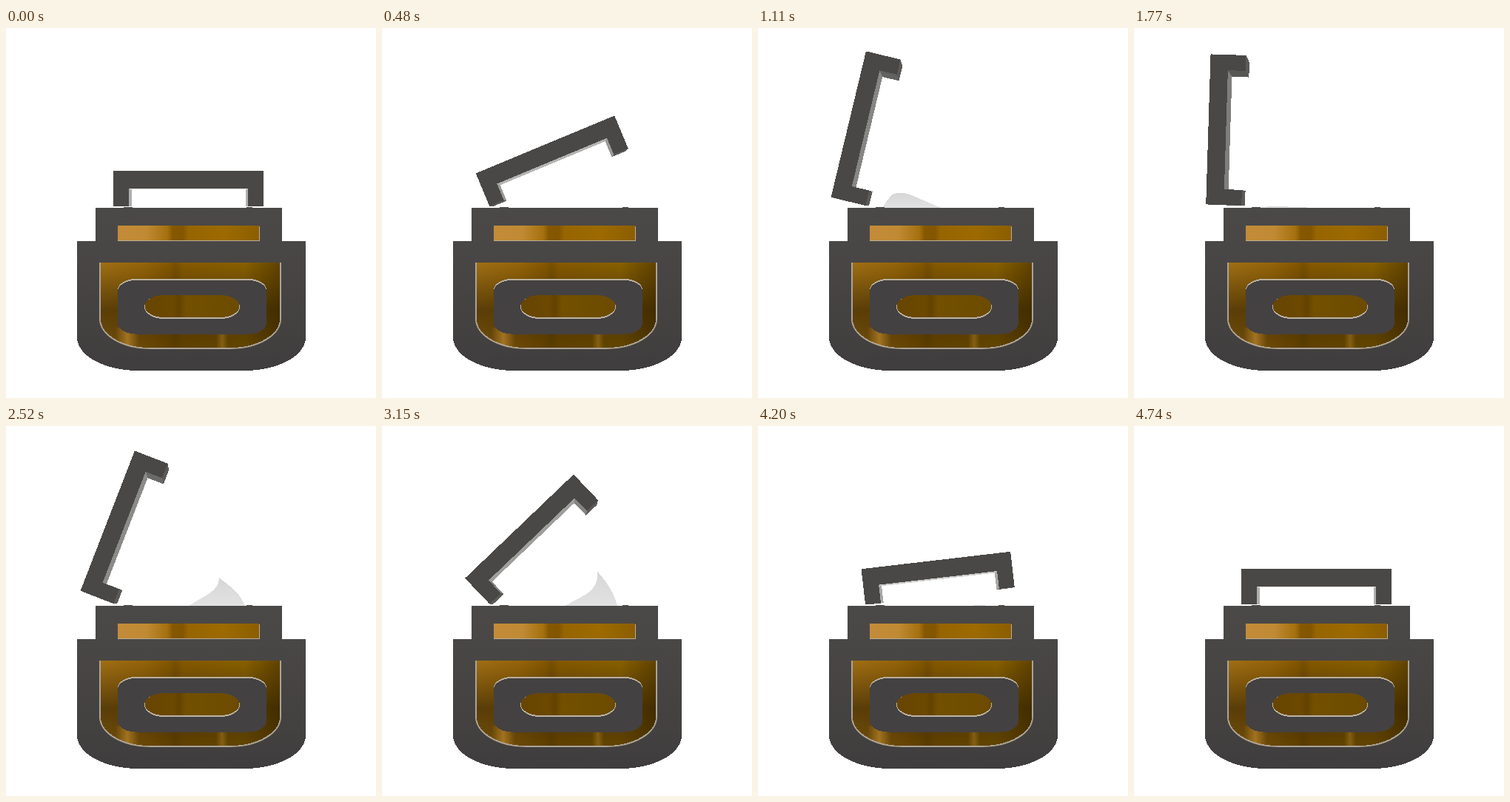
An HTML page that plays this animation: 500 by 500 pixels, repeating every 7.5 s.

```html
<!DOCTYPE html>
<html lang="en">
<head>
<meta charset="utf-8">
<title>Cream jar</title>
<style>
  html, body { margin: 0; width: 100%; height: 100%; overflow: hidden; background: #fff; }
  svg { display: block; width: 100%; height: 100%; shape-rendering: crispEdges; }
</style>
</head>
<body>
<svg viewBox="0 0 500 500">
  <defs>
    <linearGradient id="dark" gradientUnits="userSpaceOnUse" x1="0" y1="190" x2="0" y2="463">
      <stop offset="0" stop-color="#4d4b49"/>
      <stop offset=".4" stop-color="#494745"/>
      <stop offset="1" stop-color="#403d3e"/>
    </linearGradient>
    <linearGradient id="neck">
      <stop offset="0" stop-color="#c48b38"/>
      <stop offset=".2" stop-color="#c08a34"/>
      <stop offset=".35" stop-color="#a5700f"/>
      <stop offset=".39" stop-color="#855700"/>
      <stop offset=".46" stop-color="#835600"/>
      <stop offset=".5" stop-color="#976500"/>
      <stop offset=".75" stop-color="#9c6a00"/>
      <stop offset="1" stop-color="#8c5e00"/>
    </linearGradient>
    <linearGradient id="amber">
      <stop offset="0" stop-color="#a06f14"/>
      <stop offset=".25" stop-color="#956409"/>
      <stop offset=".38" stop-color="#855800"/>
      <stop offset=".42" stop-color="#785000"/>
      <stop offset=".46" stop-color="#855900"/>
      <stop offset=".8" stop-color="#886000"/>
      <stop offset="1" stop-color="#604200"/>
    </linearGradient>
    <linearGradient id="shade" x1="0" y1="0" x2="0" y2="1">
      <stop offset="0" stop-color="#2c1e00" stop-opacity="0"/>
      <stop offset=".55" stop-color="#2c1e00" stop-opacity=".6"/>
      <stop offset="1" stop-color="#2c1e00" stop-opacity=".4"/>
    </linearGradient>
    <linearGradient id="glow">
      <stop offset="0" stop-color="#b5822a" stop-opacity="0"/>
      <stop offset=".5" stop-color="#b5822a" stop-opacity=".75"/>
      <stop offset="1" stop-color="#b5822a" stop-opacity="0"/>
    </linearGradient>
    <linearGradient id="hole">
      <stop offset="0" stop-color="#684600"/>
      <stop offset=".3" stop-color="#6c4800"/>
      <stop offset=".36" stop-color="#634200"/>
      <stop offset=".44" stop-color="#735000"/>
      <stop offset="1" stop-color="#6c4b00"/>
    </linearGradient>
    <linearGradient id="white" x1="0" y1="0" x2="0" y2="1">
      <stop offset="0" stop-color="#d6d6d6"/>
      <stop offset="1" stop-color="#e2e2e2"/>
    </linearGradient>
    <path id="bowl" d="M126 317V393A69 41 0 0 0 195 434H303A69 41 0 0 0 372 393V317"/>
    <clipPath id="inside"><use href="#bowl"/></clipPath>
  </defs>

  <path id="blob" fill="url(#white)"/>
  <path id="swirl" fill="url(#white)"/>
  <g id="lid"></g>

  <path fill="#4a4846" d="M158 243L160 242H170L172 243ZM324 243L326 242H332L334 243Z"/>
  <rect x="121" y="243" width="252" height="46" fill="url(#dark)"/>
  <rect x="151" y="268" width="192" height="20" fill="#b9ad97"/>
  <rect x="151" y="267" width="191" height="20" fill="url(#neck)"/>

  <path fill="url(#dark)" d="M96 288H405V418A83 45 0 0 1 322 463H179A83 45 0 0 1 96 418Z"/>
  <g clip-path="url(#inside)">
    <rect x="126" y="317" width="246" height="117" fill="url(#amber)"/>
    <rect x="126" y="317" width="246" height="117" fill="url(#shade)"/>
    <rect x="148" y="405" width="32" height="29" fill="url(#glow)"/>
    <rect x="284" y="405" width="16" height="29" fill="url(#glow)" opacity=".6"/>
    <use href="#bowl" fill="none" stroke="#aaa498" stroke-width="4"/>
  </g>

  <rect x="151" y="339" width="201" height="74" rx="24" ry="15" fill="#b8b09c"/>
  <rect x="151" y="341" width="201" height="72.500" rx="24" ry="15" fill="#444142"/>
  <rect x="187" y="361" width="129" height="32" rx="26" ry="16" fill="#bbb4a4"/>
  <rect x="187.500" y="361" width="128" height="30" rx="26" ry="15" fill="url(#hole)"/>
</svg>
<script>
const $ = id => document.getElementById(id);
const LOOP = 7500, OPEN = 1470, CLOSE = 1500, END = 4740;
const DEPTH = 0.045, EYE = [250, 250], HINGE = [144.5, 240.3];
// Lid corners in the closed pose
const outline = [[145, 193], [348, 193], [348, 241], [327, 241], [327, 217], [166, 217], [166, 241], [145, 241]];

const addPath = fill => {
  const p = document.createElementNS("http://www.w3.org/2000/svg", "path");
  p.setAttribute("fill", fill);
  return $("lid").appendChild(p);
};
const sides = outline.map(() => addPath("#5c5a58"));
const face = addPath("#4a4846");

const clamp = (v, a, b) => Math.min(b, Math.max(a, v));
const ease = u => { u = clamp(u, 0, 1); return u * u * (3 - 2 * u); };
const mix = (a, b, p) => a + (b - a) * p;
const grey = v => `rgb(${v},${v},${v - 2})`;
const poly = pts => "M" + pts.map(p => p.map(v => v.toFixed(2)).join(" ")).join("L") + "Z";
const arch = (t, from, to) => Math.sin(Math.PI * clamp((t - from) / (to - from), 0, 1));

function drawLid(t) {
  const open = t < CLOSE ? ease(t / OPEN) : 1 - ease((t - CLOSE) / (END - CLOSE));
  const a = open * Math.PI / 2, c = Math.cos(a), s = Math.sin(a);
  const front = outline.map(([px, py]) => {
    const x = px - HINGE[0], y = py - HINGE[1];
    return [HINGE[0] + x * c + y * s, HINGE[1] - x * s + y * c];
  });
  const back = front.map(p => p.map((v, i) => mix(v, EYE[i], DEPTH)));
  front.forEach((p, i) => {
    const j = (i + 1) % front.length;
    sides[i].setAttribute("d", poly([p, front[j], back[j], back[i]]));
  });
  for (const i of [3, 5]) sides[i].setAttribute("fill", grey(mix(175, 85, open)));
  sides[4].setAttribute("fill", grey(mix(235, 125, Math.sqrt(open))));
  face.setAttribute("d", poly(front));
}

function drawBlob(t) {
  const h = 22 * arch(t, 700, 1800), y = k => 243 - h * k;
  $("blob").setAttribute("d", h < 0.1 ? "" :
    `M168 243L177 ${y(0.65)}Q182 ${y(1)} 191 ${y(1)}Q200 ${y(1)} 208 ${y(0.83)}L247 ${y(0)}Z`);
}

function drawSwirl(t) {
  const h = 46.6 * arch(t, 1780, 4220);
  const p = clamp((t - 2520) / 1260, -0.4, 1.3);
  const pt = (x0, x1, k0, k1) => `${mix(288 + x0, 295 + x1, p)} ${243 - h * (1 - mix(k0, k1, p))}`;
  $("swirl").setAttribute("d", h < 0.1 ? "" :
    `M${pt(-41, -47, 1, 1)}C${pt(-20, -20, 0.63, 0.72)} ${pt(0, 1, 0.5, 0.76)} ${pt(0, 0, 0, 0)}` +
    `C${pt(6, 7, 0.15, 0.2)} ${pt(27, 14, 0.45, 0.5)} ${pt(35, 18, 1, 1)}Z`);
}

const start = performance.now();
function draw() {
  const t = (performance.now() - start) % LOOP;
  drawLid(t);
  drawBlob(t);
  drawSwirl(t);
  requestAnimationFrame(draw);
}
draw();
</script>
</body>
</html>
```
